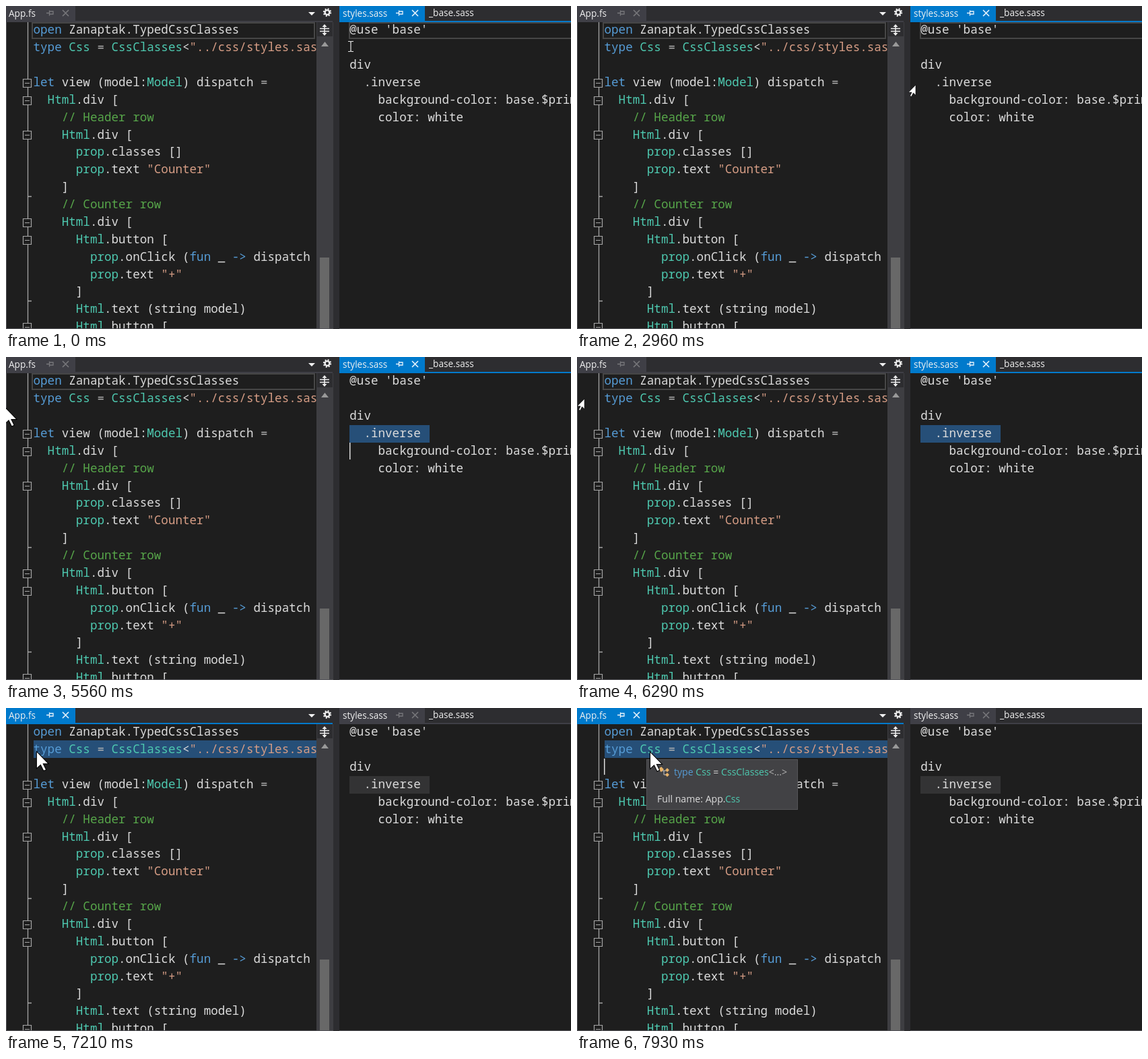
An HTML page for the animation above (8000 ms loop, 839x479 px).

```html
<!DOCTYPE html>
<html lang="en">
<head>
<meta charset="utf-8">
<title>Editor with typed CSS classes</title>
<style>
  html, body { margin: 0; width: 100%; height: 100%; overflow: hidden; background: #2d2d30; }
  svg { display: block; }
  text { white-space: pre; fill: #dcdcdc; }
  .code text { font: 17.58px "Noto Sans Mono", monospace; }
  .ui { font: 13.6px "Open Sans", sans-serif; fill: #f1f1f1; }
  .tip { font: 14.1px "Open Sans", sans-serif; }
  .keyword { fill: #569cd6; }
  .type { fill: #4ec9b0; }
  .string { fill: #d69d85; }
  .comment { fill: #57a64a; }
  .operator { fill: #b4b4b4; }
  .line { fill: none; stroke: #464646; stroke-width: 2; }
  .fold { fill: #1e1e1e; stroke: #a5a5a5; stroke-width: 1.2; }
</style>
</head>
<body>
<svg width="839" height="479" viewBox="0 0 839 479">
  <defs>
    <clipPath id="leftClip"><rect y="24" width="461" height="454"/></clipPath>
    <clipPath id="rightClip"><rect x="495" y="24" width="344" height="454"/></clipPath>
    <g id="tabIcons" fill="none">
      <path d="M0 10.500H4M4.500 6.500V14.500M4.500 8H10V12H4.500M5 12.200H10" stroke-width="1.300"/>
      <path d="M24 6L33 15M33 6L24 15" stroke-width="1.600"/>
    </g>
    <path id="pointer" d="M0 0V17L4 13.300L7 19.300L9.500 18.200L6.600 12.300H12Z" fill="#fff" stroke="#000" stroke-width=".7"/>
  </defs>

  <rect width="839" height="479" fill="#2d2d30"/>
  <rect y="24" width="461" height="455" fill="#1e1e1e"/>
  <rect x="495" y="24" width="344" height="455" fill="#1e1e1e"/>

  <g id="leftTab">
    <path d="M0 0H103V22H485V24H0Z"/>
    <text class="ui" x="4" y="16">App.fs</text>
    <use href="#tabIcons" x="60"/>
  </g>
  <g id="rightTab">
    <path d="M495 0H622V22H839V24H495Z"/>
    <text class="ui" x="500" y="16">styles.sass</text>
    <use href="#tabIcons" x="579"/>
  </g>
  <text class="ui" x="628" y="15">_base.sass</text>
  <path d="M449 9H459L454 14Z" fill="#f1f1f1"/>
  <g fill="none" stroke="#f1f1f1">
    <circle cx="477" cy="9.500" r="3.400" stroke-width="2.400"/>
    <circle cx="477" cy="9.500" r="5.200" stroke-width="2" stroke-dasharray="2.040"/>
  </g>

  <rect x="461" y="24" width="25" height="455" fill="#3e3e42"/>
  <rect x="462" y="24" width="23" height="21" fill="#2d2d30"/>
  <path d="M466 33.500H480M466 37.500H480M473 28V43" stroke="#f1f1f1" stroke-width="1.500"/>
  <path d="M469.500 31L473 27L476.500 31ZM469.500 40L473 44L476.500 40Z" fill="#f1f1f1"/>
  <path d="M468 60L473.500 53L479 60Z" fill="#999"/>
  <rect x="466" y="373" width="14" height="106" fill="#686868"/>

  <rect id="leftLine" class="line" x="39" y="25" width="419" height="23"/>
  <rect id="rightLine" class="line" x="510" y="25" width="340" height="23"/>
  <rect id="leftSelection" x="41" y="48" width="420" height="26" fill="#264f78"/>
  <rect id="rightSelection" x="510" y="101" width="119" height="26"/>

  <path d="M32.500 24V479M32.500 282.500H38M32.500 437.500H38" stroke="#a5a5a5" stroke-width="1.300"/>
  <g id="folds" clip-path="url(#leftClip)"></g>
  <g id="leftCode" class="code" clip-path="url(#leftClip)"></g>
  <g id="rightCode" class="code" clip-path="url(#rightClip)"></g>
  <path d="M.5 24V478.500H486M495 478.500H839" fill="none" stroke="#55555a"/>

  <rect id="leftCaret" x="40" y="75" width="1.500" height="24" fill="#dcdcdc"/>
  <rect id="rightCaret" x="510" y="127" width="1.500" height="25" fill="#dcdcdc"/>

  <g id="tooltip">
    <rect x="103.500" y="76.500" width="224" height="74" fill="#424245" stroke="#555558"/>
    <path d="M126 93H132M129 93V99H132" fill="none" stroke="#c8c8c8"/>
    <path d="M121 91L125 87L129 91L125 95ZM131 92L134 89L137 92L134 95ZM131 99L134 96L137 99L134 102Z" fill="#e8b36a"/>
    <text class="tip" x="144" y="100"><tspan class="keyword">type</tspan> <tspan class="type">Css</tspan> = <tspan class="type">CssClasses</tspan><tspan class="operator">&lt;...&gt;</tspan></text>
    <text class="tip" x="119" y="140">Full name: App.<tspan class="type">Css</tspan></text>
  </g>

  <path id="ibeam" d="M-4 -7.500H-1L0 -6.500L1 -7.500H4M0 -6.500V6.500M-4 7.500H-1L0 6.500L1 7.500H4" fill="none" stroke="#e4e4e4" stroke-width="1.200"/>
  <use id="arrow" href="#pointer"/>
  <use id="flipped" href="#pointer"/>
</svg>

<script>
const LOOP = 8000, STEP = 180, ROW = 25.875;
const BLUE = '#007acc', GREY = '#3f3f46';
const $ = id => document.getElementById(id);

const fsharp = `open Zanaptak.TypedCssClasses
type Css = CssClasses<"../css/styles.sass">

let view (model:Model) dispatch =
  Html.div [
    // Header row
    Html.div [
      prop.classes []
      prop.text "Counter"
    ]
    // Counter row
    Html.div [
      Html.button [
        prop.onClick (fun _ -> dispatch Increment)
        prop.text "+"
      ]
      Html.text (string model)
      Html.button [`;

const sass = `@use 'base'

div
  .inverse
    background-color: base.$primary
    color: white`;

const tokens = /(?<comment>\/\/.*)|(?<string>"[^"]*")|(?<keyword>\b(?:open|type|let|fun)\b|->)|(?<type>\b(?:CssClasses|Css|Model|Html|prop(?=\.))\b)|(?<operator>=)/g;
const escapeText = s => s.replace(/&/g, '&amp;').replace(/</g, '&lt;');

function highlight(line) {
  let html = '', end = 0;
  for (const match of line.matchAll(tokens)) {
    const kind = Object.keys(match.groups).find(k => match.groups[k]);
    html += escapeText(line.slice(end, match.index));
    html += `<tspan class="${kind}">${escapeText(match[0])}</tspan>`;
    end = match.index + match[0].length;
  }
  return html + escapeText(line.slice(end));
}

function showCode(id, x, source, format) {
  $(id).innerHTML = source.split('\n').map((line, i) =>
    `<text x="${x}" y="${41.3 + i * ROW}">${format(line)}</text>`).join('');
}

showCode('leftCode', 40.5, fsharp, highlight);
showCode('rightCode', 510.3, sass, escapeText);
$('folds').innerHTML = [3, 4, 6, 11, 12, 17].map(row => {
  const y = Math.round(37 + row * ROW) - 0.5;
  return `<path class="fold" d="M25.5 ${y - 6}h12v12h-12zM28 ${y}h7"/>`;
}).join('');

// Pointer moves: start, number of positions, shape, from, to
const moves = [
  [0, 1, 'ibeam', [512, 60], [512, 60]],
  [1310, 6, 'ibeam', [511, 66], [501, 113]],
  [2410, 4, 'flipped', [500, 102], [503, 117]],
  [4480, 6, 'arrow', [478, 106], [8, 74]],
  [5560, 1, 'arrow', [-2, 74], [-2, 74]],
  [5740, 5, 'flipped', [9, 72], [11.5, 60]],
  [7030, 4, 'arrow', [25, 62], [103.5, 71]],
  [7750, 2, 'arrow', [106, 68], [108.5, 65]]
];
const scales = { ibeam: '1', arrow: '1.5', flipped: '-.9 .9' };

const show = (id, visible) => $(id).setAttribute('visibility', visible ? 'visible' : 'hidden');
const blink = (t, start) => Math.floor((t - start) / 540) % 2 === 0;

function paintTab(id, active) {
  $(id).firstElementChild.setAttribute('fill', active ? BLUE : GREY);
  $(id).lastElementChild.setAttribute('stroke', active ? '#e8f3fb' : '#77777b');
}

function movePointer(t) {
  const [start, count, shape, from, to] = moves.findLast(move => move[0] <= t);
  const step = Math.min(count - 1, Math.floor((t - start) / STEP));
  const p = count > 1 ? step / (count - 1) : 1;
  const eased = p * p * (3 - 2 * p);
  const [x, y] = from.map((v, i) => v + (to[i] - v) * eased);
  for (const id in scales) show(id, id === shape);
  $(shape).setAttribute('transform', `translate(${x} ${y}) scale(${scales[shape]})`);
}

function render(t) {
  const rightSelected = t >= 3550, leftFocused = t >= 6470;
  paintTab('leftTab', leftFocused);
  paintTab('rightTab', !leftFocused);
  show('leftLine', !leftFocused);
  show('rightLine', !rightSelected);
  show('leftSelection', leftFocused);
  show('rightSelection', rightSelected);
  $('rightSelection').setAttribute('fill', leftFocused ? '#333334' : '#264f78');
  show('leftCaret', leftFocused && (t < 7030 || t >= 7570));
  show('rightCaret', rightSelected && !leftFocused && (t < 3920 || t >= 4480 && blink(t, 4480)));
  show('tooltip', t >= 7930);
  movePointer(t);
}

const origin = performance.now();
function frame() {
  render((performance.now() - origin) % LOOP);
  requestAnimationFrame(frame);
}
frame();
</script>
</body>
</html>
```
